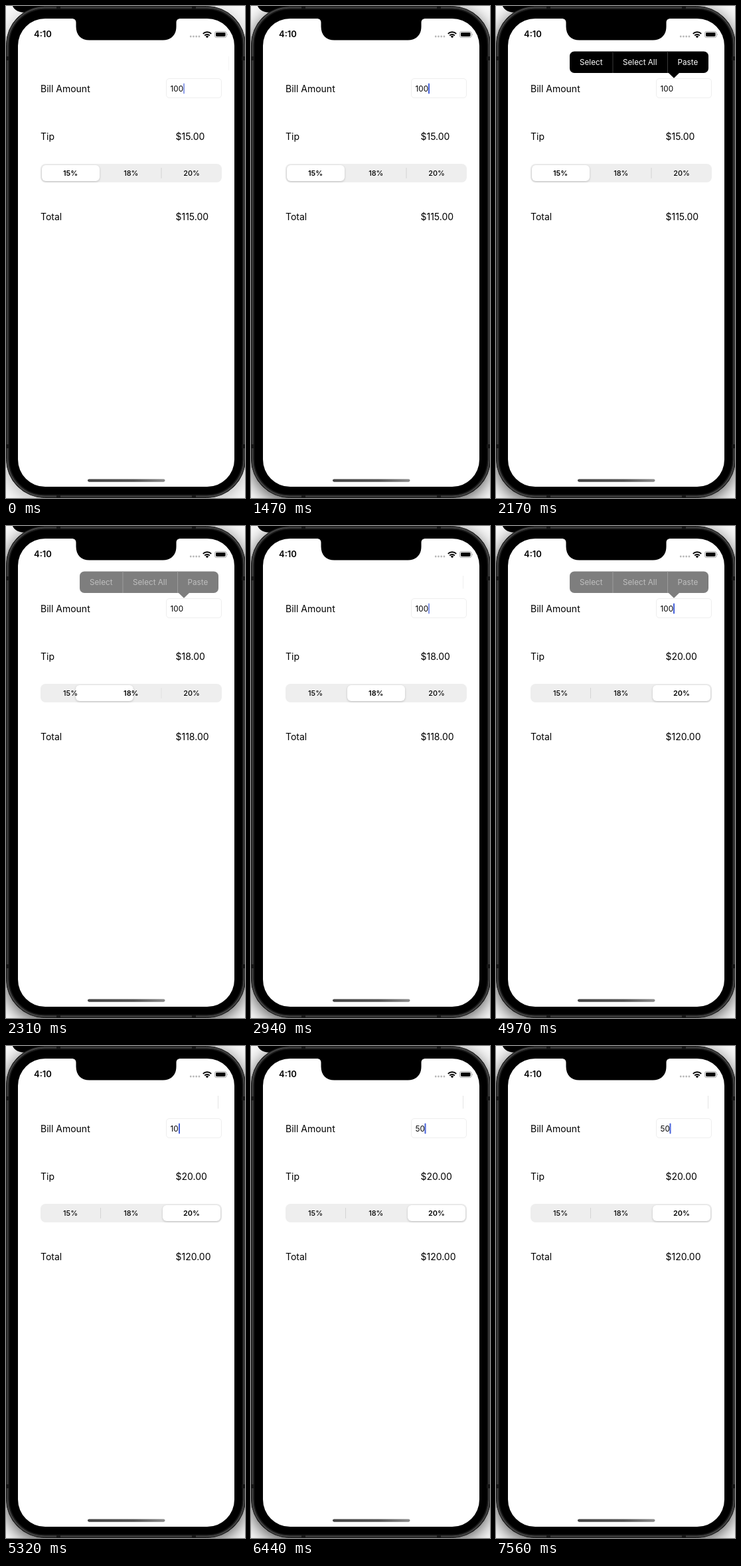
These frames come from a looping animation (360x742 px, 8 s). An HTML page:

```html
<!DOCTYPE html>
<html lang="en">
<head>
<meta charset="utf-8">
<title>Tip calculator</title>
<style>
html, body { margin: 0; width: 100%; height: 100%; overflow: hidden; background: #fff }
svg { display: block; width: 360px; height: 742px; font-family: Inter, Roboto, sans-serif; }
.body { font-size: 14px }
.small { font-size: 11.7px }
.seg { font-size: 10.9px; text-anchor: middle }
#shade { filter: blur(12px) }
#thumb { filter: drop-shadow(0 1.5px 1.5px rgba(0,0,0,.2)) }
</style>
</head>
<body>
<svg viewBox="0 0 360 742">
  <defs>
    <linearGradient id="bar">
      <stop stop-color="#444"/><stop offset=".6" stop-color="#555"/><stop offset="1" stop-color="#8c8c8c"/>
    </linearGradient>
  </defs>

  <!-- backdrop and phone body -->
  <rect width="360" height="742" fill="#f8f8f8"/>
  <rect id="shade" y="6" width="360" height="742" rx="58"/>
  <path d="M10 0C13 7 20 10 32 10L60 0Z"/>
  <rect x=".5" y=".5" width="360" height="741" rx="58" fill="#000" stroke="#1c1c1c"/>
  <rect x="2.5" y="2.5" width="356" height="737" rx="56" fill="none" stroke="#424242" stroke-width="2.5"/>
  <rect x="4.5" y="4.5" width="352" height="733" rx="54" fill="none" stroke="#1b1b1b" stroke-width="1.5"/>
  <path d="M0 79h5M355 79h5M0 664h5M355 664h5M79 0v5M283 0v5M79 737v5M283 737v5" stroke="#161616" stroke-width="6"/>
  <rect x="18" y="19" width="326" height="706" rx="41" fill="#fff"/>
  <path d="M99 18v1c4 0 6.500 2 6.500 6v6c0 13 8 20.500 20 20.500h111c12 0 20-7.500 20-20.500v-6c0-4 2.500-6 6.500-6v-1z"/>

  <!-- status bar -->
  <text x="42" y="47.300" font-size="13" font-weight="600">4:10</text>
  <path d="M278.200 46h13" stroke="#b8b8b8" stroke-width="2.800" stroke-linecap="round" stroke-dasharray="0 4.250"/>
  <g fill="none" stroke="#000" stroke-width="2">
    <path d="M296.800 41.900a8.700 8.700 0 0 1 12.400 0M299.200 44.500a5.400 5.400 0 0 1 7.600 0"/>
  </g>
  <path d="M303 48.200l-2.200-2.300a3.100 3.100 0 0 1 4.400 0z"/>
  <rect x="314.500" y="38.500" width="17.500" height="9" rx="2.600" fill="none" stroke="#a5a5a5"/>
  <rect x="316" y="40" width="14.500" height="6" rx="1.400"/>
  <path d="M333 41.500q1.800 1.500 0 3z" fill="#a5a5a5"/>

  <!-- form -->
  <g class="body">
    <text x="52" y="130">Bill Amount</text>
    <text x="52" y="202">Tip</text>
    <text x="52" y="323">Total</text>
    <text id="tip" x="255.500" y="202"></text>
    <text id="total" x="255.500" y="323"></text>
  </g>
  <rect x="241.500" y="109.500" width="83" height="29" rx="4.500" fill="#fff" stroke="#eee"/>
  <text id="bill" class="small" x="247.500" y="129"></text>
  <rect id="caret" y="116.500" width="2" height="16" rx="1" fill="#4560d8"/>

  <rect x="52" y="238" width="273" height="28" rx="7.500" fill="#eee"/>
  <path id="sep0" d="M142.500 244v16" stroke="#d4d4d4"/>
  <path id="sep1" d="M234 244v16" stroke="#d4d4d4"/>
  <rect id="thumb" y="240" width="87" height="24" rx="6" fill="#fff"/>
  <g class="seg">
    <text id="seg0" x="97" y="256">15%</text>
    <text id="seg1" x="188.300" y="256">18%</text>
    <text id="seg2" x="279.500" y="256">20%</text>
  </g>

  <!-- edit menu -->
  <path id="edge" stroke="#e4e4e4"/>
  <g id="menu">
    <rect x="111" y="68.500" width="209" height="32.500" rx="7"/>
    <path d="M259.500 100.500h17l-8.500 8.200z"/>
    <path d="M176 68.500v32.500M258.500 68.500v32.500" stroke="#3a3a3a"/>
    <g id="items" class="small" fill="#fff">
      <text x="126" y="89">Select</text>
      <text x="191" y="89">Select All</text>
      <text x="273.500" y="89">Paste</text>
    </g>
  </g>
  <rect x="123" y="713.500" width="116.500" height="4.200" rx="2.100" fill="url(#bar)"/>
</svg>

<script>
const LOOP = 8000, STEP = 70;
const $ = id => document.getElementById(id);
const set = (id, attrs) => { for (const k in attrs) $(id).setAttribute(k, attrs[k]); };
const ramp = (t, a, b) => Math.min(1, Math.max(0, (t - a) / (b - a)));
const glide = (t, a, b) => 1 - (1 - ramp(t, a, b)) ** 3;
const money = n => '$' + n.toFixed(2);

// [start, end] of each caret fade-out and the fade-in after it
const blinks = [
  [-90, 140, 630, 840], [910, 1120, 1260, 1470], [1780, 1960, 2310, 2520],
  [2870, 3080, 3220, 3430], [3850, 4130, 4270, 4480],
  [6090, 6270, 6290, 6300], [7000, 7140, 7350, 7560]
];
// [time, field text, caret x]
const typing = [
  [0, '100', 267], [5250, '10', 260], [5390, '1', 253],
  [5530, '', 247.3], [6300, '5', 254], [6440, '50', 261.5]
];
const rates = [15, 18, 20];

function draw(t) {
  const [, text, x] = typing.findLast(k => t >= k[0]);
  const hidden = Math.max(...blinks.map(([a, b, c, d]) => ramp(t, a, b) - ramp(t, c, d)));
  $('bill').textContent = text;
  set('caret', { x, opacity: 1 - hidden });

  const pick = t < 2240 ? 0 : t < 3290 ? 1 : 2;
  const rate = rates[pick];
  $('tip').textContent = money(rate);
  $('total').textContent = money(100 + rate);
  set('thumb', { x: 54 + 91 * (glide(t, 2200, 2660) + glide(t, 3230, 3700)) });
  rates.forEach((_, i) => set('seg' + i, { 'font-weight': i === pick ? 600 : 500 }));
  set('sep0', { opacity: glide(t, 3290, 3640) });
  set('sep1', { opacity: 1 - glide(t, 2240, 2590) });

  const show = ramp(t, 1470, 1750) - ramp(t, 2170, 2450)
             + ramp(t, 4550, 4830) - ramp(t, 4865, 5075);
  set('menu', { opacity: show });
  set('items', { opacity: show });

  set('shade', { opacity: .25 + .4 * ramp(t, 630, 840) });
  set('edge', {
    d: t < 700 ? 'M335.500 76v21' : 'M319.500 75v19.500',
    opacity: t < 700 ? .35 : t < 2450 ? 0 : t < 5110 ? .6 : 1
  });
}

function tick() {
  const t = performance.now() % LOOP;
  draw(Math.floor(t / STEP) * STEP);
  requestAnimationFrame(tick);
}
tick();
</script>
</body>
</html>
```
